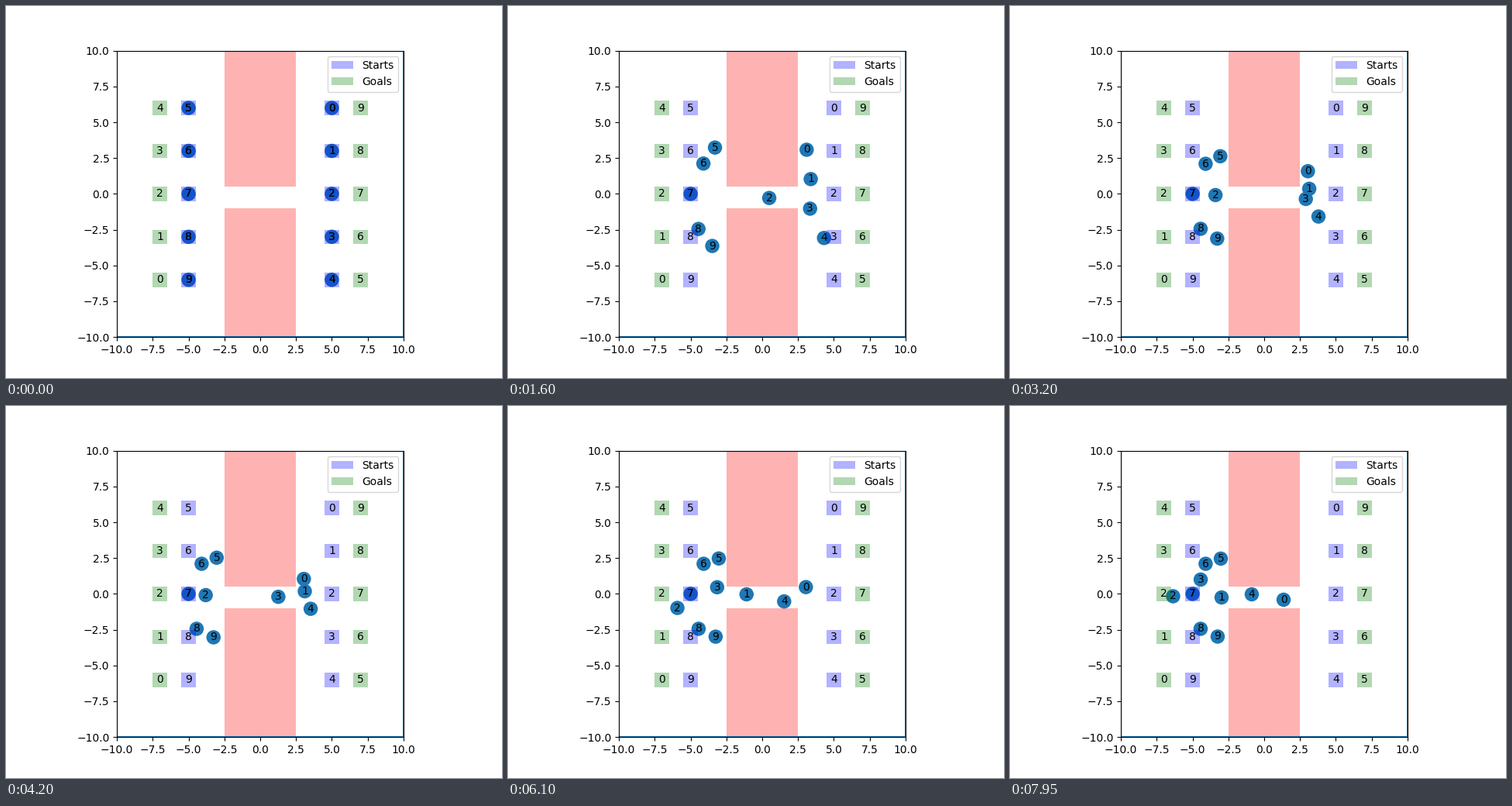
Animation of 640 by 480 pixels, one loop 8000 ms. Source, as a matplotlib script:

```python
from math import cos, exp, radians, sin

import numpy as np
import matplotlib.pyplot as plt
from matplotlib.animation import FuncAnimation
from matplotlib.patches import Circle, Rectangle

STEP = 50
FRAMES = 160
LOOP = STEP * FRAMES

# Agents that queue at the gate, then cross:
# queue x, queue time constant, departure, crossing time constant, rest point
CROSSERS = {
    0: (3.05, 450, 6300, 6000, (-4, -.41)),
    1: (3.1, 850, 4250, 2300, (-4.5, -.25)),
    3: (2.75, 1200, 3850, 1560, (-5, 1)),
    4: (2, 6200, 5200, 3250, (-4, -.03)),
}
# Agents that only settle beside the gate
RESTS = {5: (-3.03, 2.46), 6: (-4.09, 2.1), 7: (-5, 0),
         8: (-4.44, -2.44), 9: (-3.25, -2.98)}


def home(i):
    return (5 if i < 5 else -5), 6 - 3 * (i % 5)


def outer(i):
    return i % 5 in (0, 4)


def decay(a, b, t, tau):
    """Glide from a towards b, slowing down on the way."""
    return b + (a - b) * exp(-t / tau)


def smooth(u):
    return u * u * (3 - 2 * u)


def queue(i, t):
    x, y = home(i)
    gate, tau = CROSSERS[i][:2]
    return decay(x, gate, t, tau), decay(y, 0, t, 2400 if outer(i) else 1500)


def cross(i, t):
    go, tau, rest = CROSSERS[i][2:]
    x, y = queue(i, min(t, go))
    if t > go:
        x = decay(x, rest[0], t - go, tau)
        y += (rest[1] - y) * smooth((t - go) / (LOOP - go))
    return x, y


def lead(t):
    """Drive straight through the gate, then turn around agent 7."""
    r = np.interp(t, [0, 2950, 4200, 6400], [10, 1.7, 1.2, 1.37])
    turn = min(max((t - 4000) / 2400, 0), 1) ** 2
    angle = radians(-3 - 170 * turn)
    return -5 + r * cos(angle), r * sin(angle)


def settle(i, t):
    x, y = home(i)
    rx, ry = RESTS[i]
    tau_x, tau_y = (800, 1050) if outer(i) else (400, 400)
    return decay(x, rx, t, tau_x), decay(y, ry, t, tau_y)


def position(i, t):
    if t == 0:
        return home(i)
    if i in CROSSERS:
        return cross(i, t)
    return lead(t) if i == 2 else settle(i, t)


def label(x, y, text):
    return ax.text(x, y, text, ha="center", va="center")


def block(x, y, w, h, color):
    return ax.add_patch(Rectangle((x, y), w, h, color=color, alpha=.3, lw=0))


def cell(x, y, text, color):
    label(x, y, text)
    return block(x - .5, y - .5, 1, 1, color)


fig, ax = plt.subplots(figsize=(6.4, 4.8), dpi=100)
ax.plot([-10, 10, 10, -10, -10], [-10, -10, 10, 10, -10], lw=1.5)
ax.set_aspect("equal")
ax.set_xlim(-10, 10)
ax.set_ylim(-10, 10)

discs = [ax.add_patch(Circle(home(i), .5)) for i in range(10)]
block(-2.5, -10, 5, 9, "red")
block(-2.5, .5, 5, 9.5, "red")

for i in range(10):
    x, y = home(i)
    start = cell(x, y, i, "blue")
    goal = cell(-1.4 * x, -y, i, "green")

tags = [label(*home(i), i) for i in range(10)]
ax.legend([start, goal], ["Starts", "Goals"], loc="upper right")


def update(frame):
    for i, (disc, tag) in enumerate(zip(discs, tags)):
        spot = position(i, frame * STEP)
        disc.center = spot
        tag.set_position(spot)
    return discs + tags


anim = FuncAnimation(fig, update, frames=FRAMES, interval=STEP,
                     repeat=True, repeat_delay=0, blit=False)
plt.show()
```
